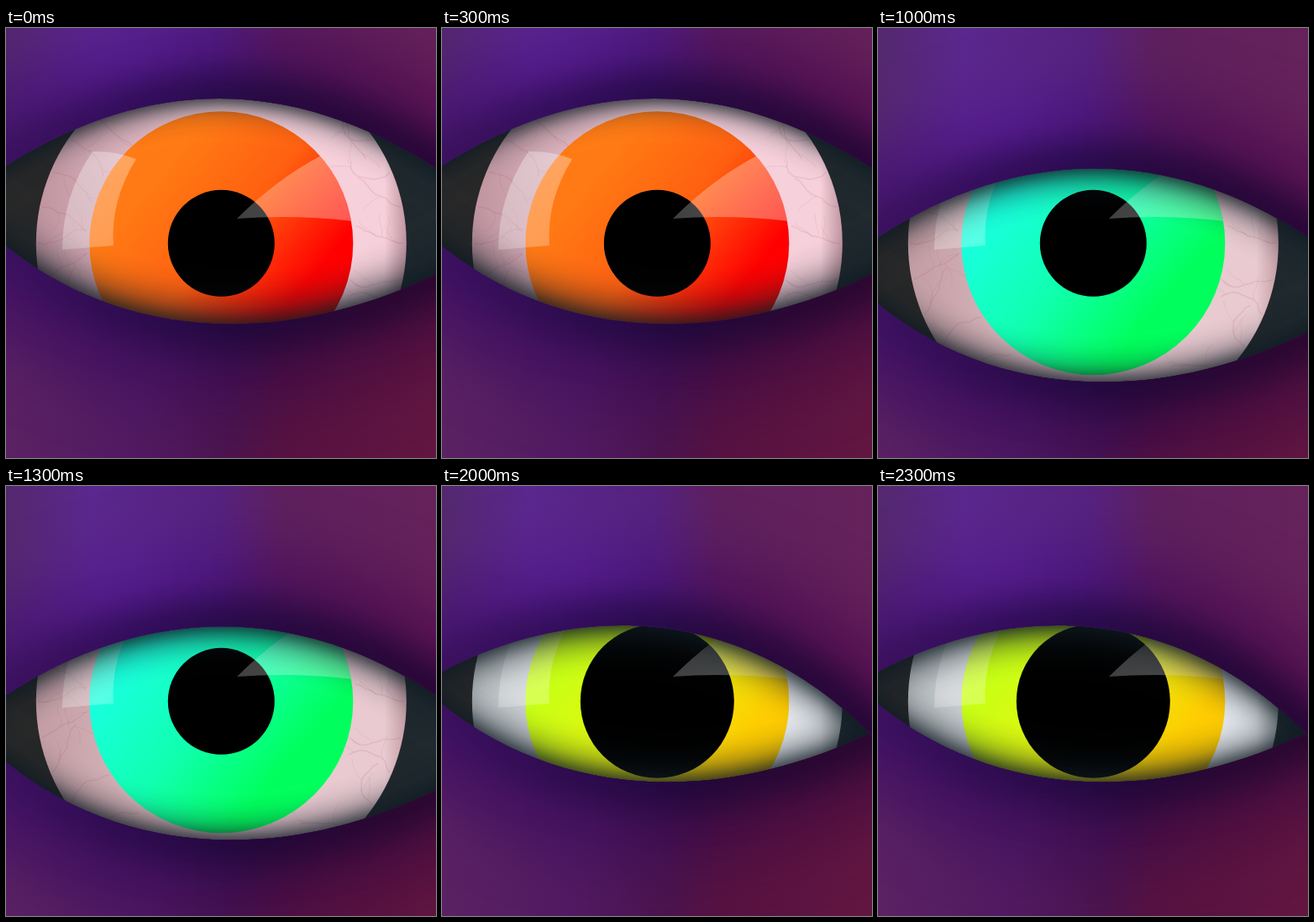
Recreate the animation shown at these times as an HTML page with a canvas. Size 512 by 512 pixels, loop 2.5 s.

```html
<!DOCTYPE html>
<html lang="en">
<head>
<meta charset="utf-8">
<title>Eye</title>
<style>
html, body { margin: 0; width: 100%; height: 100%; overflow: hidden; background: #2a0a48; }
canvas { display: block; width: 512px; height: 512px; }
</style>
</head>
<body>
<canvas id="stage" width="512" height="512"></canvas>
<script>
const ctx = document.getElementById('stage').getContext('2d');
const STEP = 500, C = 256.3;

// Lid edges: left y, first control x/y, second control x/y, right y
const UPPER = {
  open: [164, 170, 57, 340, 57, 167],
  low: [249, 165, 141, 347, 139, 249],
  slant: [221, 150, 142, 350, 133, 297]
};
const LOWER = {
  mid: [260, 150, 380, 345, 375, 293],
  slant: [211, 120, 340, 300, 386, 309],
  low: [329, 150, 449, 345, 444, 362]
};

const FIRE = ['#ff7a14', '#ff6010', '#ff0000'];
const MINT = ['#18ffdc', '#10ffb0', '#00ff5c'];
const VIOLET = ['#8a2cff', '#641cff', '#0600ff'];
const LEMON = ['#c8ff14', '#e6f60c', '#ffcc00'];
const PINK = ['#be949f', '#f6d0da'], ROSE = ['#c29da3', '#e8cad0'];
const WHITE = ['#c4c4c4', '#ffffff'], GREY = ['#bcc2c4', '#e8ebef'];

// top / bottom: [shadow reach, shadow blur]
const POSES = [
  { up: UPPER.open, low: LOWER.mid, iris: FIRE, white: PINK, pupil: 63.5, veins: true, top: [4, 38], bottom: [13, 46] },
  { up: UPPER.open, low: LOWER.slant, iris: MINT, white: WHITE, pupil: 63.5, top: [4, 38], bottom: [13, 46] },
  { up: UPPER.low, low: LOWER.low, iris: MINT, white: ROSE, pupil: 63.5, veins: true, top: [10, 42], bottom: [8, 42] },
  { up: UPPER.slant, low: LOWER.slant, iris: VIOLET, white: GREY, pupil: 113.5, top: [14, 44], bottom: [14, 44] },
  { up: UPPER.slant, low: LOWER.mid, iris: LEMON, white: GREY, pupil: 91.5, top: [12, 44], bottom: [10, 44] }
];

function linear(x0, y0, x1, y1, stops) {
  const g = ctx.createLinearGradient(x0, y0, x1, y1);
  stops.forEach((s, i) => Array.isArray(s)
    ? g.addColorStop(s[0], s[1])
    : g.addColorStop(i / (stops.length - 1), s));
  return g;
}

function disc(r, fill) {
  ctx.beginPath();
  ctx.arc(C, C, r, 0, Math.PI * 2);
  ctx.fillStyle = fill;
  ctx.fill();
}

// Lid edge carried past the stage along its end tangents
function edge([y0, ax, ay, bx, by, y1]) {
  const p = new Path2D();
  p.moveTo(-300, y0 - 300 * (ay - y0) / ax);
  p.lineTo(0, y0);
  p.bezierCurveTo(ax, ay, bx, by, 512, y1);
  p.lineTo(812, y1 + 300 * (y1 - by) / (512 - bx));
  return p;
}

function region(lid, far) {
  const p = edge(lid);
  p.lineTo(812, far);
  p.lineTo(-300, far);
  p.closePath();
  return p;
}

function veins() {
  let seed = 11;
  const rnd = () => (seed = seed * 16807 % 2147483647) / 2147483647;
  function branch(x, y, angle, steps, width) {
    ctx.lineWidth = width;
    ctx.beginPath();
    ctx.moveTo(x, y);
    const forks = [];
    for (let i = 0; i < steps; i++) {
      angle += (rnd() - 0.5) * 1.1;
      x += Math.cos(angle) * 7;
      y += Math.sin(angle) * 7;
      ctx.lineTo(x, y);
      if (rnd() < 0.22) forks.push([x, y, angle + (rnd() < 0.5 ? -0.8 : 0.8)]);
    }
    ctx.stroke();
    if (width > 0.8) forks.forEach(f => branch(...f, 4, 0.7));
  }
  ctx.strokeStyle = 'rgba(170,60,80,.13)';
  for (let i = 0; i < 18; i++) {
    const a = (i < 9 ? -0.8 : Math.PI - 0.8) + (i % 9) * 0.2;
    branch(C + 218 * Math.cos(a), C + 218 * Math.sin(a), a + Math.PI, 9, 1.4);
  }
}

function highlights() {
  ctx.fillStyle = linear(70, 150, 150, 260, ['rgba(255,255,255,.36)', 'rgba(255,255,255,.24)']);
  ctx.beginPath();
  ctx.moveTo(103, 147);
  ctx.quadraticCurveTo(67, 200, 67, 264);
  ctx.lineTo(128, 259);
  ctx.quadraticCurveTo(124, 206, 155, 156);
  ctx.quadraticCurveTo(130, 146, 103, 147);
  ctx.fill();

  ctx.save();
  ctx.beginPath();
  ctx.arc(C, C, 157, 0, Math.PI * 2);
  ctx.clip();
  ctx.fillStyle = linear(275, 227, 413, 190, ['rgba(255,255,255,.25)', 'rgba(255,255,255,.33)']);
  ctx.beginPath();
  ctx.moveTo(275, 227);
  ctx.quadraticCurveTo(322, 180, 375, 152);
  ctx.lineTo(440, 152);
  ctx.lineTo(440, 233);
  ctx.lineTo(413, 230);
  ctx.quadraticCurveTo(345, 222, 275, 227);
  ctx.fill();
  ctx.restore();
}

// A wide soft shadow plus a tight one along the lid
function castShadow(area, dir, [reach, blur]) {
  ctx.save();
  ctx.fillStyle = '#200838';
  [[reach, blur, 0.9], [2, 18, 0.6]].forEach(([dy, soft, alpha]) => {
    ctx.shadowColor = `rgba(14,26,34,${alpha})`;
    ctx.shadowBlur = soft;
    ctx.shadowOffsetY = dir * dy;
    ctx.fill(area);
  });
  ctx.restore();
}

function skin(lid, area, far, mid, near) {
  ctx.save();
  ctx.clip(area);
  ctx.fillStyle = far;
  ctx.fillRect(0, 0, 512, 512);
  const line = edge(lid);
  [[190, 34, mid, 0.85], [64, 20, near, 0.85]].forEach(([width, blur, color, alpha]) => {
    ctx.filter = `blur(${blur}px)`;
    ctx.globalAlpha = alpha;
    ctx.lineWidth = width;
    ctx.strokeStyle = color;
    ctx.stroke(line);
  });
  ctx.restore();
}

function draw(pose) {
  ctx.fillStyle = linear(0, 0, 512, 0, ['#272727', '#222424', '#1e282e']);
  ctx.fillRect(0, 0, 512, 512);

  const [left, right] = pose.white;
  disc(220.5, linear(36, 0, 477, 0, [[0, left], [0.5, right], [0.94, right], [1, left]]));
  if (pose.veins) veins();
  disc(157, linear(171, 185, 340, 326, pose.iris));
  disc(pose.pupil, '#000');
  highlights();

  const top = region(pose.up, -300), bottom = region(pose.low, 812);
  castShadow(top, 1, pose.top);
  castShadow(bottom, -1, pose.bottom);

  skin(pose.low, bottom,
    linear(0, 0, 512, 0, [[0, '#5a2262'], [0.3, '#511a62'], [0.52, '#4b144e'], [0.64, '#561242'], [1, '#621640']]),
    linear(0, 0, 512, 0, [[0, '#451264'], [0.4, '#40105c'], [0.56, '#380c4c'], [0.68, '#440c40'], [1, '#4a0e40']]),
    linear(0, 0, 512, 0, [[0, '#381060'], [0.3, '#280a4a'], [0.55, '#1c0738'], [1, '#22062c']]));
  skin(pose.up, top,
    linear(0, 0, 512, 0, [[0, '#54286e'], [0.2, '#5a288e'], [0.5, '#56227e'], [0.64, '#5e205e'], [1, '#65225a']]),
    linear(0, 0, 512, 0, [[0, '#461670'], [0.28, '#561a90'], [0.5, '#48147c'], [0.64, '#4c1056'], [1, '#540f50']]),
    linear(0, 0, 512, 0, [[0, '#380f5a'], [0.3, '#2a0a4e'], [0.55, '#1e083c'], [1, '#1c0430']]));
}

const start = performance.now();
let shown = -1;
function tick() {
  const i = Math.floor((performance.now() - start) / STEP) % POSES.length;
  if (i !== shown) draw(POSES[shown = i]);
  requestAnimationFrame(tick);
}
tick();
</script>
</body>
</html>
```
